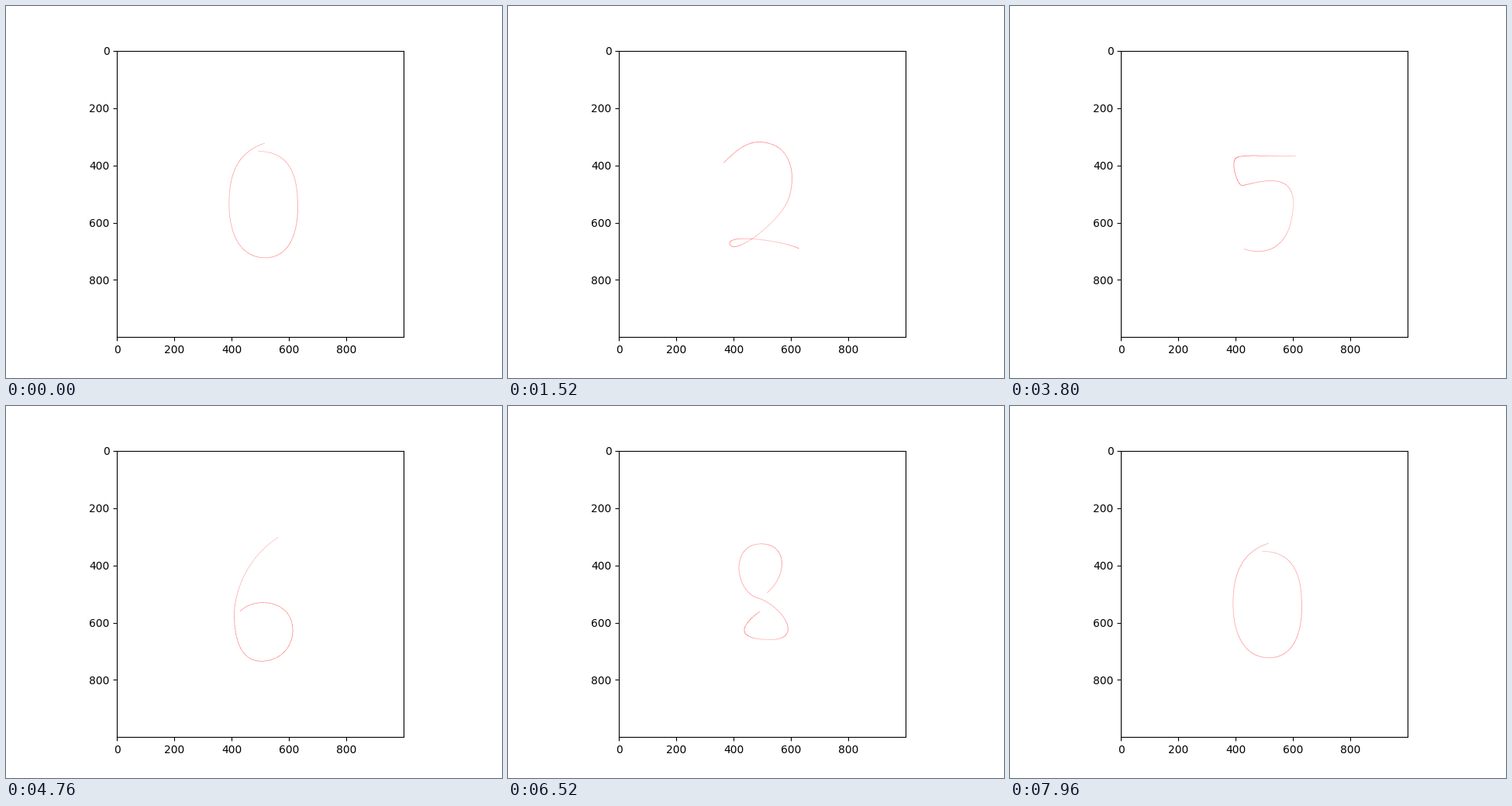
A matplotlib script that plays this animation: 640x480 px, repeating every 8 s.

```python
import numpy as np
import matplotlib.pyplot as plt
from matplotlib.animation import FuncAnimation

STEPS = 20              # frames per morph, both ends included
SHIFT = 260 + 276j      # places the digits on the 1000 x 1000 canvas
X0, Y0, W, H = 330, 280, 320, 470   # part of the canvas that is drawn on
COMPASS = {"N": -1j, "S": 1j, "E": 1, "W": -1}


def key(x, y, heading, speed=75):
    """Pen position and velocity; letters of the heading add up ("SSE")."""
    way = sum(COMPASS[c] for c in heading)
    return x + y * 1j + SHIFT, speed * way / abs(way)


def digit(*keys):
    return np.array([key(*k) for k in keys])


# Each digit: five points the pen passes, with its heading there.
digits = [
    digit((254, 47, "WWWS", 102), (131, 258, "S", 100), (256, 446, "E", 89),
          (369, 275, "N"), (231, 75, "W", 134)),
    digit((138, 180, "NE", 120), (243, 43, "NE", 20), (253, 167, "S"),
          (255, 303, "S", 109), (255, 424, "S")),
    digit((104, 111, "NE"), (271, 50, "EEES"), (336, 241, "SSSW", 85),
          (120, 405, "NNNW", 52), (373, 414, "EES", 51)),
    digit((96, 132, "N", 119), (311, 107, "SSE", 100), (182, 250, "NNNNW", 36),
          (338, 388, "SSW", 129), (93, 391, "NNNW", 57)),
    digit((374, 244, "W", 126), (131, 239, "W", 61), (192, 84, "NE"),
          (260, 108, "SSSSSW", 140), (247, 438, "S", 3)),
    digit((340, 52, "W", 114), (144, 61, "SSW", 19), (152, 223, "SSSE", 21),
          (361, 302, "S", 137), (147, 409, "WWWN", 123)),
    digit((301, 26, "WWWSS", 135), (149, 296, "S"), (242, 458, "E"),
          (348, 321, "NNNNW"), (168, 285, "SW")),
    digit((108, 52, "EEEN"), (312, 38, "E"), (294, 166, "SSW", 24),
          (231, 295, "SSW", 30), (198, 452, "S")),
    digit((243, 242, "EEENN", 110), (240, 43, "W", 113),
          (225, 247, "EEES", 88), (248, 432, "W", 155), (217, 255, "NE")),
    digit((322, 105, "N", 99), (151, 85, "SSSW", 56), (219, 190, "E", 58),
          (322, 122, "NW", 36), (297, 448, "S")),
]

t = np.linspace(0, 1, 200, endpoint=False)[:, None]


def curve(keys):
    """Dots along the cubic Beziers that join neighbouring keys."""
    pos, vel = keys.T
    a, d = pos[:-1], pos[1:]
    b, c = a + vel[:-1], d - vel[1:]
    s = 1 - t
    return (a * s**3 + 3 * b * t * s**2 + 3 * c * t**2 * s + d * t**3).ravel()


def raster(keys):
    img = np.full((H, W, 3), 255, np.uint8)
    dots = np.rint(curve(keys))
    x, y = dots.real.astype(int), dots.imag.astype(int)
    img[y - Y0, x - X0] = (255, 0, 0)
    return img


fig, ax = plt.subplots(figsize=(6.4, 4.8), dpi=100)
canvas = ax.imshow(raster(digits[0]), extent=(X0 - .5, X0 + W - .5,
                                              Y0 + H - .5, Y0 - .5))
ax.set(xlim=(-.5, 999.5), ylim=(999.5, -.5))


def draw(i):
    n, k = divmod(i, STEPS)
    a, b = digits[n % 10], digits[(n + 1) % 10]
    canvas.set_data(raster(a + (b - a) * k / (STEPS - 1)))
    return [canvas]


anim = FuncAnimation(fig, draw, frames=10 * STEPS, interval=40,
                     repeat=True, repeat_delay=0)
plt.show()
```
